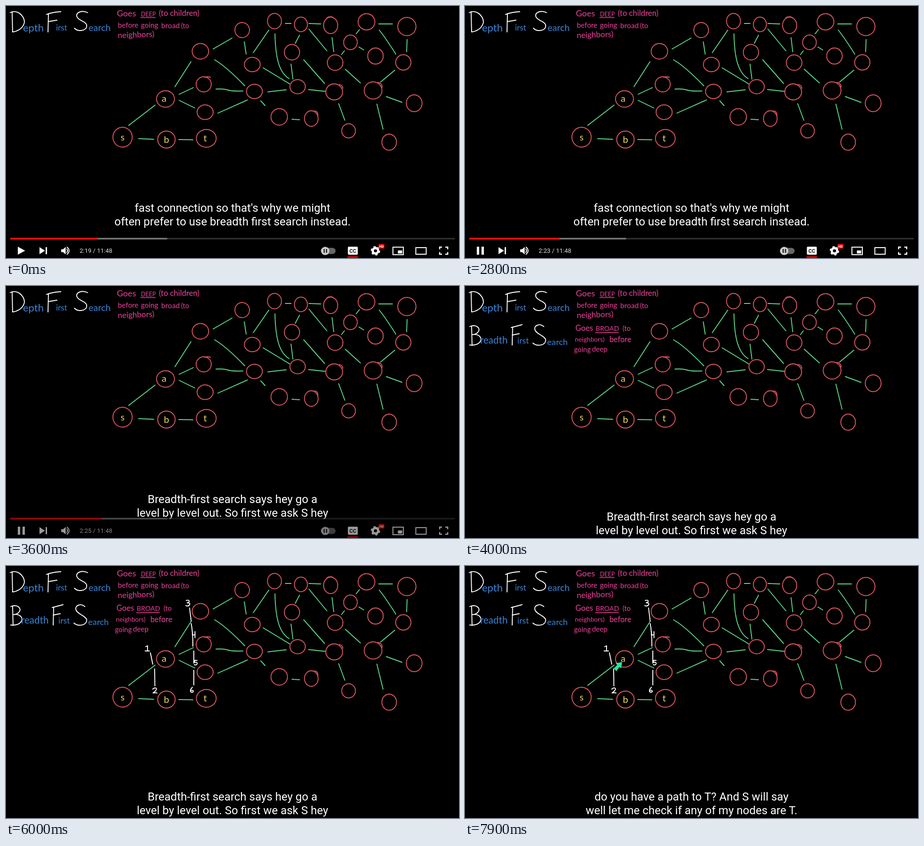
Animation of 960x534 px, one loop 8000 ms. Source, as an HTML page:

```html
<!DOCTYPE html>
<html lang="en">
<head>
<meta charset="utf-8">
<title>Depth first and breadth first search</title>
<style>
html, body { margin: 0; width: 100%; height: 100%; overflow: hidden; background: #000; }
svg { display: block; width: 960px; height: 534px; }
.pen { fill: none; stroke-width: 1.9; stroke-linecap: round; stroke-linejoin: round; }
.hand { font-family: Lato, sans-serif; }
.ui { font-family: Roboto, sans-serif; }
</style>
</head>
<body>
<svg viewBox="0 0 960 534">
  <g class="pen" stroke="#5cd385">
    <path d="M260 253L316 210M281 281L313 282.5M366 283L396 283.5M358 171L392 118M367 187L397 173
      M367 200L400 216M439 91L479 68M442 114Q465 127 506 169M445 176Q460 175 470 178T502 180M449 227L512 199
      M505 76L509 102M524 99L557 51M545 131L601 165M570 59C571 105 577 140 600 154M604 123L608 155"/>
    <path d="M555 182L594 177.5M540 201L549 211M592 37H604M642 37L667 38M622 62L613 79M642 49L680 95
      M691 67L694.5 97M631 114L675 164M641 177L678 181M606 240L622 241M705 207L718 242M711 103L717 95
      M719 134L751 163M742 59L749 50M790 38H819M791 51Q804 67 826 102M850 71L849 97M748 87L758 93
      M794 161L824 136M806 192L839 204M786 208L799 261"/>
  </g>
  <g class="pen" stroke="#d9555f" id="nodes">
    <path d="M421 151Q427 149 433 151M680 25Q684 22 691 23M706 167Q712 166 714 174M788 162Q797 163 797 172M652 223Q660 220 661 232"/>
  </g>
  <g class="hand" id="labels" font-size="20" fill="#f0d95a" text-anchor="middle">
    <text x="247" y="285" font-size="19">s</text>
    <text x="335" y="202.500">a</text>
    <text x="340" y="289.500">b</text>
    <text x="422" y="287">t</text>
  </g>

  <g class="hand">
    <path class="pen" stroke="#fff" d="M13 12L14 55M9 14C27 5 43 27 38 38C34 49 23 54 14 55
      M90 16L89 55M86 18Q98 13 116 12M90 33L108 30
      M173 14C160 8 148 14 150 22C153 32 172 32 171 43C170 53 152 55 145 47"/>
    <g fill="#3b84d8">
      <text x="36" y="54" font-size="22">epth</text>
      <text x="106" y="52" font-size="17">irst</text>
      <text x="175" y="53" font-size="19.500">earch</text>
    </g>
    <g fill="#ee429b">
      <text x="235" y="22" font-size="18">Goes</text>
      <text x="286" y="22" font-size="12.500">DEEP</text>
      <text x="324" y="21" font-size="16.600">(to children)</text>
      <text x="237" y="46" font-size="15.300">before</text>
      <text x="286" y="46" font-size="15.200">going</text>
      <text x="329" y="47" font-size="15.500">broad</text>
      <text x="371" y="47" font-size="14.600">(to</text>
      <text x="237" y="68" font-size="17" transform="rotate(-2 237 68)">neighbors)</text>
      <path d="M285 24.500H317" stroke="#ee429b" stroke-width="1.500"/>
    </g>
  </g>

  <g class="hand" id="broad">
    <path class="pen" stroke="#fff" d="M14 86L15 126M10 86C24 80 34 90 28 97C25 102 18 103 16 103C28 101 36 108 33 116C30 125 16 126 10 125
      M101 87L100 125M98 88L121 82M100 104L115 101
      M167 86C158 78 146 84 148 92C150 102 171 106 171 115C170 127 152 128 144 121"/>
    <g fill="#3b84d8">
      <text x="32" y="122" font-size="20.500">readth</text>
      <text x="111" y="122" font-size="17.500">irst</text>
      <text x="174" y="125" font-size="18.200">earch</text>
    </g>
    <g fill="#ee429b">
      <text x="234" y="95" font-size="16.600">Goes</text>
      <text x="277" y="95" font-size="14.200">BROAD</text>
      <text x="334" y="95" font-size="14.600">(to</text>
      <text x="233" y="118" font-size="13.700">neighbors)</text>
      <text x="306" y="119" font-size="16.300">before</text>
      <text x="231" y="140" font-size="14.800">going</text>
      <text x="269" y="139" font-size="15.200">deep</text>
      <path d="M276 99L326 98.500" stroke="#ee429b" stroke-width="1.500"/>
    </g>
  </g>
  <g class="pen" stroke="#fff" id="order"></g>
  <path id="arrow" fill="#2de39b" d="M333 203.500L331 217L327.500 214L320.500 223L315.500 217L322.500 209.500L319 206Z"/>

  <path id="bezel" fill="#fff" d="M-7.500 -9.200L7.500 0L-7.500 9.200Z"/>

  <g class="ui" id="caption" fill="#fff" font-size="24" text-anchor="middle">
    <text x="480" y="436"></text>
    <text x="480" y="464.500"></text>
  </g>

  <g class="ui" id="controls" fill="#fff">
    <path fill="#333" d="M9 491.500H951V494.500H9Z"/>
    <path fill="#808080" d="M9 491.500H341.500V494.500H9Z"/>
    <rect id="played" x="9" y="491.500" height="3" fill="#f00"/>
    <path id="play"/>
    <path d="M71 511L82.500 518.500L71 526ZM84 511H87V526H84Z"/>
    <path d="M117 515.500H121L126.500 510.500V526.500L121 521.500H117Z"/>
    <path class="pen" stroke="#fff" d="M129 515Q132 518.500 129 522M129.500 511Q138 518.500 129.500 526"/>
    <text id="clock" x="156" y="522.500" font-size="13" fill="#ddd"></text>
    <rect x="667" y="512.500" width="31.500" height="13" rx="6.500" fill="#666"/>
    <circle cx="676.500" cy="519" r="8.700" fill="#ccc"/>
    <path fill="#222" d="M673 515H675.500V523H673ZM678 515H680.500V523H678Z"/>
    <rect x="724.500" y="510" width="21" height="17" rx="2"/>
    <text x="735" y="522.500" font-size="11" font-weight="700" fill="#111" text-anchor="middle">CC</text>
    <rect x="723.500" y="530.500" width="23" height="3" rx="1" fill="#f00"/>
    <g fill="none" stroke="#fff">
      <circle cx="783" cy="518.700" r="5.700" stroke-width="4.800"/>
      <circle cx="783" cy="518.700" r="8.500" stroke-width="3" stroke-dasharray="4.450"/>
      <path stroke-width="2" d="M820 511H842V527H820ZM868.500 512H890.500V526H868.500Z"/>
      <path stroke-width="2.500" d="M919 515.500V511H924M931 511H936V515.500M936 521.500V526H931M924 526H919V521.500"/>
    </g>
    <path d="M830.500 518H839.500V524.500H830.500Z"/>
    <rect x="789.500" y="504" width="12.500" height="10" rx="1" fill="#d00"/>
    <text x="795.800" y="511.700" font-size="7" font-weight="700" text-anchor="middle">HD</text>
  </g>
</svg>
<script>
const $ = id => document.getElementById(id);
const LOOP = 8000, STEP = 100, BAR = 942, LENGTH = 708;

function add(parent, tag, attrs) {
  const el = document.createElementNS('http://www.w3.org/2000/svg', tag);
  for (const k in attrs) el.setAttribute(k, attrs[k]);
  return parent.appendChild(el);
}

// centre x, centre y, radius x, radius y
const nodes = [
  [247, 278, 20.5, 21], [338, 197, 19, 17.5], [340, 283, 18.5, 18], [424.5, 280.5, 21, 18.7],
  [412, 96, 17.5, 16.5], [419, 166, 16, 16], [422, 225, 17, 15.5], [500.5, 51, 15.5, 16],
  [522, 124, 16.8, 15.3], [526.5, 181, 16.8, 15.3], [579, 235, 17.5, 17.5], [647, 238.5, 14.5, 16.5],
  [569, 32, 14.8, 16.3], [625, 39, 13.8, 15.5], [688, 41, 15, 17.5], [606, 98, 16.2, 16.5],
  [618, 171, 16.3, 15], [697.5, 120, 16.5, 16.5], [695.5, 182, 17.8, 17], [726, 264.5, 14.5, 15],
  [764, 33.5, 17.7, 17.3], [849.5, 43.5, 19.3, 19.3], [730, 77, 14.5, 15.5], [783, 106, 16.5, 17],
  [842, 119.5, 16.2, 16.3], [778, 179, 18.8, 18.2], [865, 206, 16.7, 17.8], [812, 288.5, 15.5, 17]
];
for (const [cx, cy, rx, ry] of nodes) add($('nodes'), 'ellipse', { cx, cy, rx, ry });

// visiting order marks, in the order they are written
const marks = [
  'M296 171L300 169V180M295 180H304',
  'M306 184L311 208M315 218L315.500 254',
  'M311 261Q316 256 319 260Q319 264 311.500 269Q317 268 320 269',
  'M382 73Q389 71 388 76Q387 78 384 78Q391 78 389 82Q387 86 381 84',
  'M389 89L392.500 117M392.500 122Q396 140 396 170',
  'M395 139V146H400M400.500 139V152',
  'M398 180V206M405 200H399.500V204Q406 203 405 207Q404 211 399 209',
  'M398 221V252M395 257Q390 262 391 266Q394 269 397 266Q397 262 391 264'
].map((d, i) => ({ el: add($('order'), 'path', { d }), at: i < 7 ? 4600 + 100 * i : 5500 }));

const captions = [
  [0, "fast connection so that's why we might", 'often prefer to use breadth first search instead.'],
  [3200, 'Breadth-first search says hey go a', 'level by level out. So first we ask S hey'],
  [6800, 'do you have a path to T? And S will say', 'well let me check if any of my nodes are T.']
];
const PLAY = 'M25 510L40.500 518.500L25 527Z', PAUSE = 'M25 510H30V527H25ZM35 510H40V527H35Z';

const clamp = v => Math.min(1, Math.max(0, v));
const show = (el, on) => el.setAttribute('visibility', on ? 'visible' : 'hidden');

function draw(t) {
  const sec = 139 + Math.max(0, t - 500) / 500;
  $('played').setAttribute('width', BAR * sec / LENGTH);
  $('clock').textContent = `2:${Math.floor(sec - 120)} / 11:48`;
  $('play').setAttribute('d', t < 500 ? PLAY : PAUSE);

  const grow = clamp((t - 500) / 600);
  show($('bezel'), t >= 500 && grow < 1);
  $('bezel').setAttribute('transform', `translate(480.500 270.500) scale(${1 + grow})`);
  $('bezel').setAttribute('opacity', 1 - grow);

  const hide = clamp((t - 3500) / 250);
  $('controls').setAttribute('opacity', 1 - hide);
  $('caption').setAttribute('transform', `translate(0 ${61 * hide})`);
  const [, ...lines] = captions.filter(c => t >= c[0]).pop();
  lines.forEach((s, i) => $('caption').children[i].textContent = s);

  show($('broad'), t >= 3700);
  for (const m of marks) show(m.el, t >= m.at);
  show($('arrow'), t >= 7600);
}

function tick() {
  const t = performance.now() % LOOP;
  draw(Math.floor(t / STEP) * STEP);
  requestAnimationFrame(tick);
}
tick();
</script>
</body>
</html>
```
